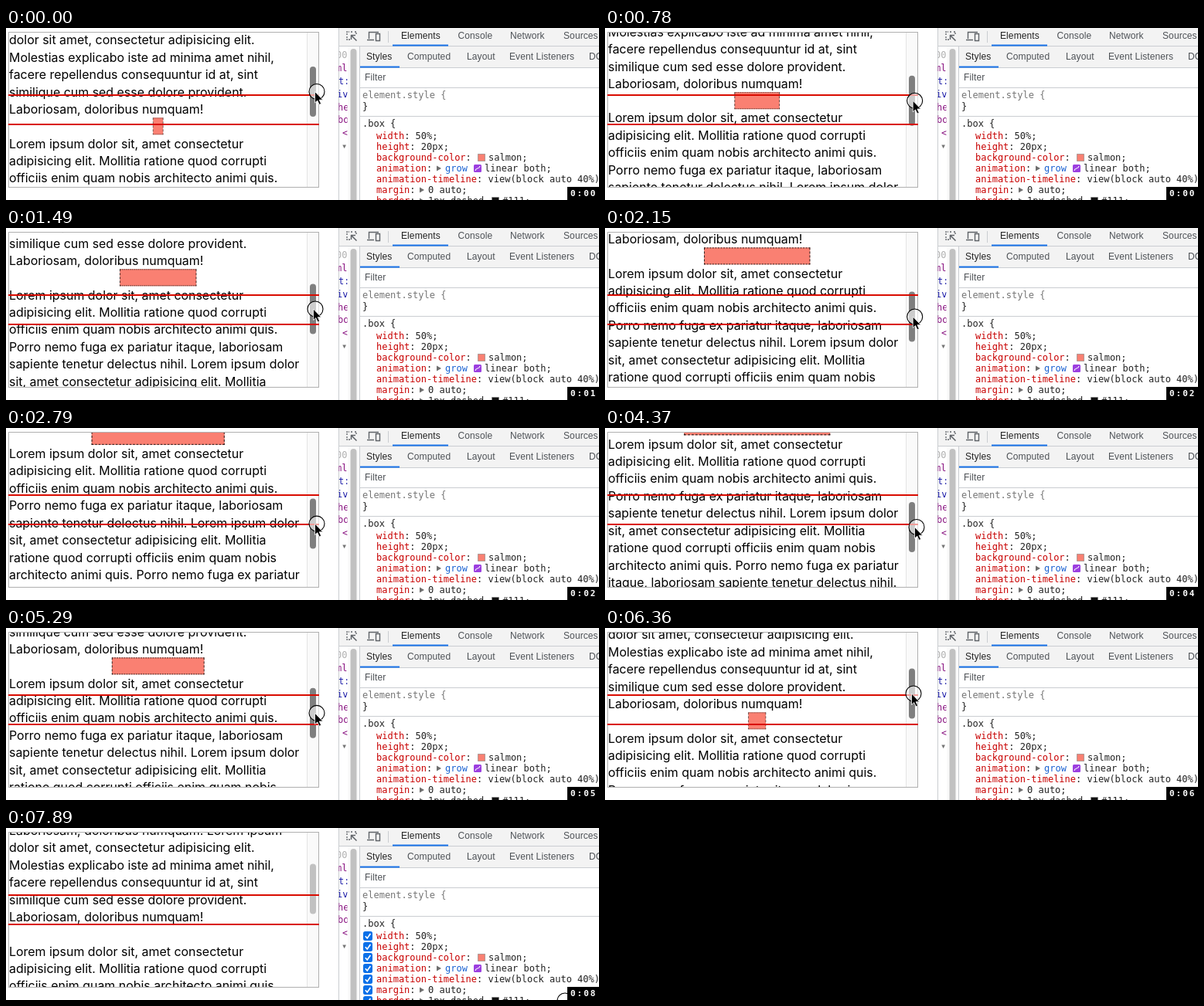
An HTML page that plays this animation: 767x223 px, repeating every 8000 ms.

```html
<!DOCTYPE html>
<html lang="en">
<head>
<meta charset="utf-8">
<title>Scroll-linked box</title>
<style>
html, body { margin: 0; width: 100%; height: 100%; overflow: hidden; background: #fff; }
svg { display: block; width: 767px; height: 223px; }
text { white-space: pre; }
.copy { font: 15.93px Inter, "Noto Sans", sans-serif; fill: #000; }
.ui { font: 12px "Liberation Sans", Arial, sans-serif; fill: #4d5156; letter-spacing: .1px; }
.ui.on { fill: #222; }
.code { font: 12px "DejaVu Sans Mono", monospace; fill: #222; }
.prop { fill: #c80000; }
.tag { fill: #881280; }
.attr { fill: #1a1aa6; }
.dim { fill: #757575; }
.pale { fill: #b0b0b0; }
.clock { font: bold 11px "DejaVu Sans Mono", monospace; fill: #fff; letter-spacing: 2px; }
</style>
</head>
<body>
<svg id="stage" viewBox="0 0 767 223">
  <defs>
    <clipPath id="port"><rect x="4" y="6" width="400" height="200"/></clipPath>
    <clipPath id="tree"><rect x="430.5" y="24" width="11" height="199"/></clipPath>
  </defs>
  <rect width="767" height="223" fill="#fff"/>
  <g clip-path="url(#port)">
    <g id="copy"></g>
    <g id="box">
      <rect width="193" height="22" fill="salmon"/>
      <path d="M0 .5H193M0 21.5H193M.5 0V22M192.5 0V22" stroke="#111" stroke-dasharray="3 2" fill="none"/>
    </g>
    <rect x="389" y="6" width="15" height="200" fill="#fafafa"/>
    <path d="M389.5 6V206" stroke="#e4e4e4"/>
    <rect id="thumb" x="393" width="8" height="65" rx="4"/>
  </g>
  <rect x="3.5" y="5.5" width="401" height="201" fill="none" stroke="#b0b0b0"/>
  <path d="M3 87H405M3 125H405" stroke="#d90b00" stroke-width="2"/>
  <g id="panel"></g>
  <g id="checks"></g>
  <g id="pointer">
    <circle r="10" fill="#fff" fill-opacity=".6" stroke="#000" stroke-width="1.1"/>
    <path d="M-2.5 0V14.5L.8 11.6 3.2 16.8 5.6 15.7 3.2 10.7H7.8Z" fill="#000" stroke="#fff" stroke-width=".8"/>
  </g>
  <rect x="726" y="206" width="41" height="17" fill="#000"/>
  <text id="clock" class="clock" x="730" y="218"></text>
</svg>
<script>
const LOOP = 8000, RELEASE = 6650, LINE = 22.45;
const $ = id => document.getElementById(id);

function add(parent, name, attrs, text) {
  const el = document.createElementNS('http://www.w3.org/2000/svg', name);
  for (const k in attrs) el.setAttribute(k, attrs[k]);
  if (text) el.textContent = text;
  parent.appendChild(el);
  return el;
}

// Page copy: y = 0 is the middle of the first line under the box.
const above = [
  'Laboriosam, doloribus numquam! Lorem ipsum',
  'dolor sit amet, consectetur adipisicing elit.',
  'Molestias explicabo iste ad minima amet nihil,',
  'facere repellendus consequuntur id at, sint',
  'similique cum sed esse dolore provident.',
  'Laboriosam, doloribus numquam!'
];
const below = [
  'Lorem ipsum dolor sit, amet consectetur',
  'adipisicing elit. Mollitia ratione quod corrupti',
  'officiis enim quam nobis architecto animi quis.',
  'Porro nemo fuga ex pariatur itaque, laboriosam',
  'sapiente tenetur delectus nihil. Lorem ipsum dolor',
  'sit, amet consectetur adipisicing elit. Mollitia',
  'ratione quod corrupti officiis enim quam nobis',
  'architecto animi quis. Porro nemo fuga ex pariatur',
  'itaque, laboriosam sapiente tenetur delectus nihil.',
  'Lorem ipsum dolor sit, amet consectetur'
];
const copyLine = (s, y) => add($('copy'), 'text', { class: 'copy', x: 4, y: y + 5.5 }, s);
above.forEach((s, i) => copyLine(s, (i - above.length) * LINE - 22));
below.forEach((s, i) => copyLine(s, i * LINE));

// Inspector panel
const panel = $('panel');
const rect = (x, y, width, height, fill, extra) => add(panel, 'rect', { x, y, width, height, fill, ...extra });
const label = (s, x, y, cls, parent = panel) => add(parent, 'text', { class: cls, x, y: y + 4.3 }, s);
const path = (d, stroke, extra) => add(panel, 'path', { d, stroke, fill: 'none', ...extra });

rect(430, 0, 337, 223, '#fff');
rect(430, 0, 337, 23, '#f3f3f3');
rect(457, 24, 310, 27, '#f3f3f3');
rect(442, 24, 15, 199, '#fafafa');
rect(445.5, 27, 8, 210, '#c1c1c1', { rx: 4 });
path('M430.5 0V223M430 23.5H767M457.5 24V223M457 51.5H767M457 77.5H767M457 114.5H767M494.5 4V19', '#cacdd1');
rect(500, 21.5, 72, 2, '#1a73e8');
rect(458, 49.5, 51, 2, '#1a73e8');

path('M441 9V5H444M446 5H449M451 5H453V8M441 11V15H445', '#5f6368', { 'stroke-width': 1.3, 'stroke-dasharray': '2 1' });
path('M446 9.5H452M446.5 9V15M447 10L453.5 16.5', '#5f6368', { 'stroke-width': 1.5 });
path('M469.5 14V5.5H482M467 15.5H476M478.5 7.5H483.5V16.5H478.5Z', '#5f6368', { 'stroke-width': 1.4 });

[['Elements', 511], ['Console', 584.5], ['Network', 652], ['Sources', 721]]
  .forEach(([s, x], i) => label(s, x, 10, i ? 'ui' : 'ui on'));
[['Styles', 466], ['Computed', 519], ['Layout', 596], ['Event Listeners', 651], ['DOM Breakpoints', 754]]
  .forEach(([s, x], i) => label(s, x, 37, i ? 'ui' : 'ui on'));
label('Filter', 464, 64, 'ui');

const tree = add(panel, 'g', { 'clip-path': 'url(#tree)' });
[['00', 'pale', 427], ['ml', 'tag', 427], ['t:', 'attr', 430], ['iv', 'attr', 428],
 ['he', 'tag', 429], ['bo', 'tag', 429], ['<', 'tag', 435], ['▾', 'dim', 434]]
  .forEach(([s, cls, x], i) => label(s, x, 35 + i * 16.8, 'code ' + cls, tree));

label('element.style {', 461, 86.5, 'code dim');
label('}', 461, 102, 'code');
label('.box {', 461, 124, 'code');

const rowY = i => 140 + i * 14;
const swatch = (x, y, fill) => rect(x + .5, y - 4.5, 9, 9, fill, { stroke: '#808080', 'stroke-opacity': .6 });
const arrow = (x, y) => add(panel, 'path', { d: `M${x} ${y - 3.5}l6 3.5-6 3.5z`, fill: '#6e6e6e' });
['width: 50%;', 'height: 20px;', 'background-color:', 'animation:',
 'animation-timeline: view(block auto 40%);', 'margin:', 'border:'].forEach((s, i) => {
  const el = label('', 479, rowY(i), 'code');
  const cut = s.indexOf(':');
  add(el, 'tspan', { class: 'prop' }, s.slice(0, cut));
  add(el, 'tspan', {}, s.slice(cut));
});
swatch(610, 168, 'salmon');
label('salmon;', 624, rowY(2), 'code');
arrow(557, 182);
label('grow', 568, rowY(3), 'code').style.fill = '#1a62d2';
rect(605, 177, 10, 10, '#9c3fe0', { rx: 1.5 });
path('M607 185C608 180 612 184 613 179', '#fff', { 'stroke-width': 1.2 });
label('linear both;', 619, rowY(3), 'code');
arrow(535, 210);
label('0 auto;', 546, rowY(5), 'code');
arrow(535, 224);
label('1px dashed', 546, rowY(6), 'code');
swatch(628, 224, '#111');
label('#111;', 642, rowY(6), 'code');

for (let i = 0; i < 7; i++) {
  const y = rowY(i);
  add($('checks'), 'rect', { x: 462, y: y - 6, width: 12, height: 12, rx: 2.5, fill: '#0b70e8' });
  add($('checks'), 'path', { d: `M464.8 ${y + .3}l2.4 2.7 4.2-6`, stroke: '#fff', 'stroke-width': 1.7, fill: 'none' });
}

// Smooth monotone curve through [time, value] points
function curve(pts) {
  const n = pts.length - 1;
  const slope = i => (pts[i + 1][1] - pts[i][1]) / (pts[i + 1][0] - pts[i][0]);
  const tan = pts.map((_, i) => {
    if (i === 0) return slope(0);
    if (i === n) return slope(n - 1) / 2;
    const a = slope(i - 1), b = slope(i);
    return a * b > 0 ? 2 * a * b / (a + b) : 0;
  });
  return t => {
    if (t <= pts[0][0]) return pts[0][1];
    if (t >= pts[n][0]) return pts[n][1];
    let i = 0;
    while (t > pts[i + 1][0]) i++;
    const h = pts[i + 1][0] - pts[i][0], u = (t - pts[i][0]) / h, v = 1 - u;
    return pts[i][1] * (1 + 2 * u) * v * v + h * tan[i] * u * v * v
      + pts[i + 1][1] * (3 - 2 * u) * u * u - h * tan[i + 1] * u * u * v;
  };
}

const scroll = curve([[0, 150], [1490, 87], [2790, 33.5], [3610, 6], [3850, 6], [4370, 21], [5290, 72], [6360, 143], [RELEASE, 160]]);
const dragX = curve([[0, 402], [1490, 400], [2790, 402], [3610, 404], [3850, 404], [4370, 403], [5290, 402], [6360, 399]]);
const freeX = curve([[RELEASE, 399], [7080, 578], [7890, 723]]);
const freeY = curve([[RELEASE, 79], [7080, 185], [7890, 224]]);

function draw(now) {
  const t = now % LOOP;
  const y = scroll(t), top = 50 + (150 - y) * .357;
  const wide = Math.max(0, Math.min(193, 13 + (150 - y) * 1.365));
  const free = t > RELEASE;
  const cx = free ? freeX(t) : dragX(t);
  const cy = free ? freeY(t) : top + 32.5;
  const sec = t >= 7890 ? 8 : Math.floor(t / 1000);

  $('copy').setAttribute('transform', `translate(0 ${y})`);
  $('box').setAttribute('transform', `translate(${196.7 - wide / 2} ${y - 33.7}) scale(${wide / 193} 1)`);
  $('box').style.display = wide < 1 ? 'none' : '';
  $('thumb').setAttribute('y', top);
  $('thumb').setAttribute('fill', cx < 390 || cx > 412 ? '#c1c1c1' : '#7f7f7f');
  $('pointer').setAttribute('transform', `translate(${cx} ${cy})`);
  $('checks').style.display = cx > 457 && cy > 117 ? '' : 'none';
  $('clock').textContent = '0:0' + sec;
}

let start;
function tick(now) {
  start ??= now;
  draw(now - start);
  requestAnimationFrame(tick);
}
draw(0);
requestAnimationFrame(tick);
</script>
</body>
</html>
```
